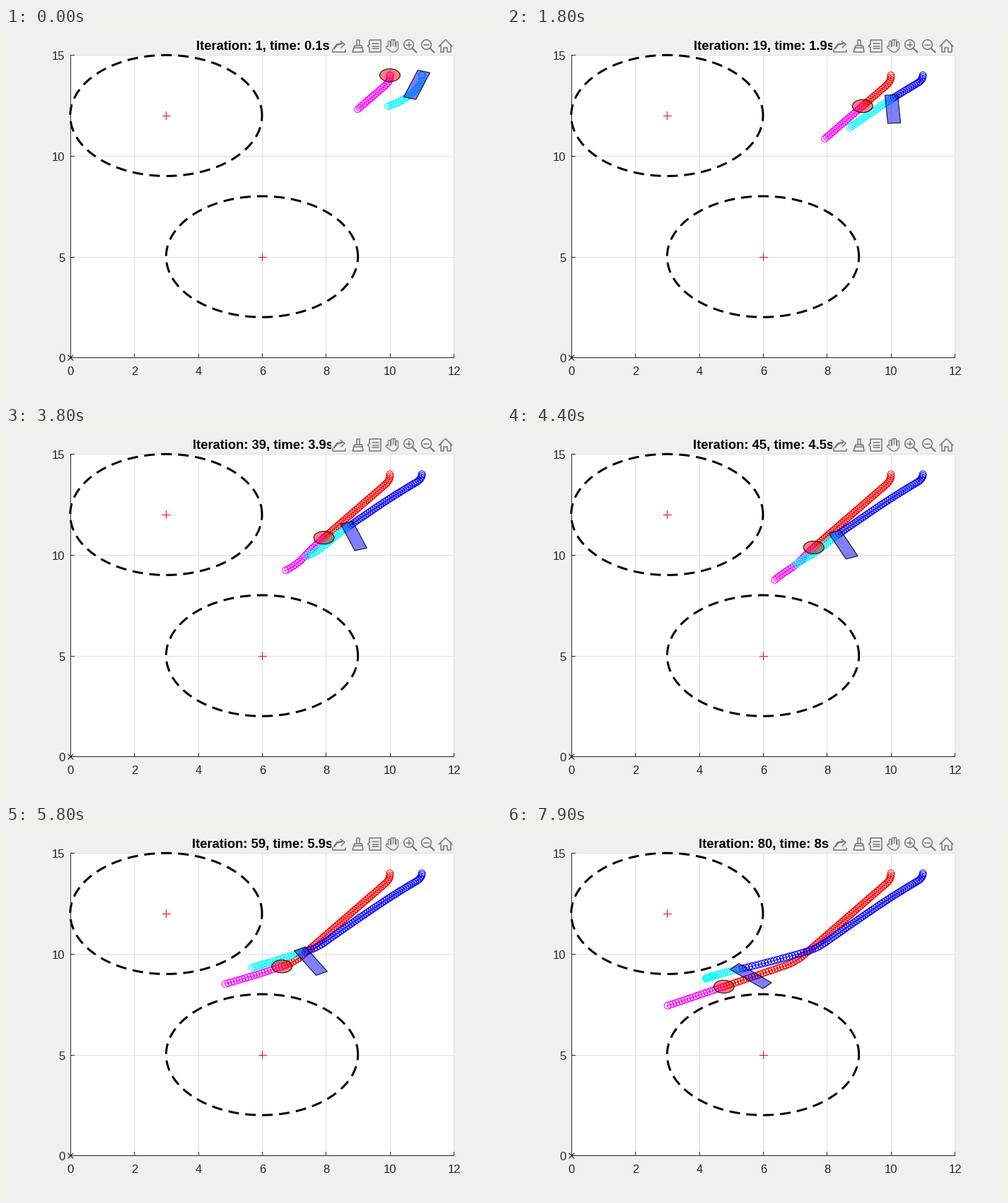
These frames come from a looping animation (700x525 px, 8 s). A matplotlib script:

```python
import matplotlib.pyplot as plt
import numpy as np
from matplotlib.animation import FuncAnimation
from matplotlib.patches import Circle, Ellipse, Polygon, Rectangle

W, H, DPI = 700, 525, 100
FRAMES, STEP, HORIZON = 80, 100, 20
PX = 72 / DPI
DARK, GRID, BACK, ICON = "#262626", "#dfdfdf", "#f0f0f0", "#747474"
ORIGIN = np.array([90.8, 466.2])
SCALE = np.array([45.21, -28.525])


def to_px(pts):
    return ORIGIN + SCALE * np.asarray(pts, float)


# Motion, in plot units
def drive(start, speed, heading):
    """Robot positions, with speed and heading eased between (steps, values)."""
    k = np.arange(FRAMES + HORIZON)
    v, a = np.interp(k, *speed), np.radians(np.interp(k, *heading))
    moves = np.column_stack([v * np.cos(a), v * np.sin(a)])
    return np.array(start) + np.vstack([[0, 0], np.cumsum(moves, axis=0)])


red = drive((10, 14), ([0], [.1]), ([0, 5, 49, 57], [270, 234, 234, 208.5]))
blue = drive((11, 14), ([0, 20, 60, 79, 99], [.08, .096, .1, .11, 0]),
             ([0, 5, 25, 49, 57, 79, 99], [266, 223, 227, 228.5, 205, 200, 212]))
tilt = np.interp(np.arange(FRAMES), [0, 20, 45, 69, 79], [71.6, 96, 113.5, 124.5, 137])


def bump(k, centre):
    return np.exp(-((k - centre) / 6) ** 2 / 2)


def forecast(path, k, late, sag=(0, 0)):
    """Path ahead, bent by the planner's error around the two obstacles."""
    u = np.linspace(0, 1, HORIZON + 1)[:, None]
    error = bump(k, 46) * np.array([.29, -.35]) + bump(k, 64) * np.array(late)
    droop = np.exp(-k / 5) * np.sin(.78 * np.pi * u) * np.array(sag)
    return path[k:k + HORIZON + 1] + error * u**2 + droop


def body(k):
    a = np.radians(tilt[k])
    ahead, side = np.array([np.cos(a), np.sin(a)]), np.array([-np.sin(a), np.cos(a)])
    return to_px([blue[k] + f * ahead + s * side
                  for f, s in [(.2, .2), (.2, -.2), (-1.2, -.2), (-1.2, .2)]])


# Stage
fig = plt.figure(figsize=(W / DPI, H / DPI), dpi=DPI, facecolor=BACK)
ax = fig.add_axes([0, 0, 1, 1])
ax.set_xlim(0, W)
ax.set_ylim(H, 0)
ax.axis("off")


def line(pts, color, width=1, z=2, **kw):
    return ax.plot(*np.transpose(pts), color=color, lw=width * PX, zorder=z, **kw)[0]


def label(x, y, s, size, **kw):
    return ax.text(x, y, s, family="Liberation Sans", fontsize=size * PX,
                   va="baseline", **kw)


def cross(x, y, r, color, arms):
    for dx, dy in arms:
        line([(x - r * dx, y - r * dy), (x + r * dx, y + r * dy)], color, z=3)


# Plot area
(x0, y0), (x1, y1) = to_px([(0, 0), (12, 15)])
ax.add_patch(Rectangle((x0, y1), x1 - x0, y0 - y1, fc="white", ec="none", zorder=0))
for v in range(0, 13, 2):
    x = to_px((v, 0))[0]
    line([(x, y0), (x, y1)], GRID, z=1)
    line([(x, y0), (x, y0 - 5)], DARK)
    label(x + .5, 491, str(v), 16.67, ha="center", color=DARK)
for v in range(0, 16, 5):
    y = to_px((0, v))[1]
    line([(x0, y), (x1, y)], GRID, z=1)
    line([(x0, y), (x0 + 5, y)], DARK)
    label(83.5, y + 7, str(v), 16.67, ha="right", color=DARK)
line([(x0, y1), (x0, y0), (x1, y0)], DARK)

# Obstacles and goal
turn = np.linspace(0, 2 * np.pi, 400)
round_trip = np.column_stack([np.cos(turn), np.sin(turn)])
for centre in [(3, 12), (6, 5)]:
    line(to_px(centre + 3 * round_trip), "black", 3, 3,
         dashes=(5, 3), dash_capstyle="butt")
    cross(*to_px(centre), 5.5, "red", [(1, 0), (0, 1)])
cross(x0 + .5, y0 + .5, 3.5, "black", [(1, 1), (1, -1)])

# Robots, trails and plans
ring = np.vstack([4.8 * round_trip[::16], 4.8 * round_trip[:1], [[np.nan, np.nan]]])


def set_chain(chain, path):
    pts = to_px(path)
    rings = (pts[:, None] + ring).reshape(-1, 2)
    chain.set_data(*np.vstack([pts, [[np.nan, np.nan]], rings]).T)


red_trail, red_plan, blue_trail, blue_plan = [
    line([(0, 0)], c, z=4 + i)
    for i, c in enumerate(["red", "magenta", "blue", "cyan"])]
disc = ax.add_patch(Ellipse((0, 0), 28.8, 18.2, fc=(1, 0, 0, .5), ec="black",
                            lw=PX, zorder=8))
box = ax.add_patch(Polygon(np.zeros((4, 2)), fc=(0, 0, 1, .5), ec="black",
                           lw=PX, zorder=8))
title = label(363, 31, "", 18.33, ha="center", weight="bold", zorder=9)

# Toolbar, which hides the end of long titles
ax.add_patch(Rectangle((459.5, 13), 175, 25, fc=BACK, ec="none", zorder=10))


def stroke(*pts, width=1.5, color=ICON, z=11):
    line(pts, color, width, z, solid_joinstyle="round", solid_capstyle="round")


def share():
    stroke((462, 30), (462, 33.5), (480, 33.5), (480, 31))
    stroke((464, 29), (468, 23.5), (475, 22), width=2.5)
    stroke((473, 18.5), (479, 23), (474, 28))


def brush():
    stroke((496, 25), (496, 16.5), (499.5, 16.5), (499.5, 25))
    stroke((492, 28), (493, 25), (503, 25), (504, 28), (492, 28))
    stroke((492, 28), (490, 34), (505, 34), (504, 28))


def note():
    stroke((514, 23), (514, 17), (530, 17), (530, 34), (514, 34), (514, 28),
           (511.5, 25.5), (514, 23))
    for y in (22, 25.5, 29):
        stroke((518, y), (527, y))


def hand():
    for color, grow, z in [(ICON, 2.6, 11), (BACK, 0, 12)]:
        for i, top in enumerate([20, 18, 18, 21]):
            x = 542 + 3.5 * i
            stroke((x, top), (x, 29), width=1.8 + grow, color=color, z=z)
        stroke((539, 27), (544, 31), width=1.8 + grow, color=color, z=z)
        ax.add_patch(Ellipse((547.5, 29.5), 10 + grow, 8 + grow, fc=color,
                             ec="none", zorder=z))


def lens(cx, plus):
    ax.add_patch(Circle((cx, 23.5), 6.8, fc="none", ec=ICON, lw=1.5 * PX, zorder=11))
    stroke((cx + 5, 28.5), (cx + 11, 34.5), width=2)
    stroke((cx - 3.5, 23.5), (cx + 3.5, 23.5))
    if plus:
        stroke((cx, 20), (cx, 27))


def house():
    stroke((612, 26), (621.5, 16.5), (631, 26))
    stroke((614.5, 24), (614.5, 34), (619, 34), (619, 27.5), (624, 27.5),
           (624, 34), (628.5, 34), (628.5, 24))


share()
brush()
note()
hand()
lens(569.5, True)
lens(594.5, False)
house()


def update(k):
    set_chain(red_trail, red[:k + 1])
    set_chain(blue_trail, blue[:k + 1])
    set_chain(red_plan, forecast(red, k, (-.09, .23)))
    set_chain(blue_plan, forecast(blue, k, (.49, .14), (.07, -.35)))
    disc.center = tuple(to_px(red[k]))
    box.set_xy(body(k))
    title.set_text(f"Iteration: {k + 1}, time: {(k + 1) / 10:g}s")
    return red_trail, blue_trail, red_plan, blue_plan, disc, box, title


anim = FuncAnimation(fig, update, frames=FRAMES, interval=STEP, repeat=True,
                     repeat_delay=0, blit=False)
plt.show()
```
